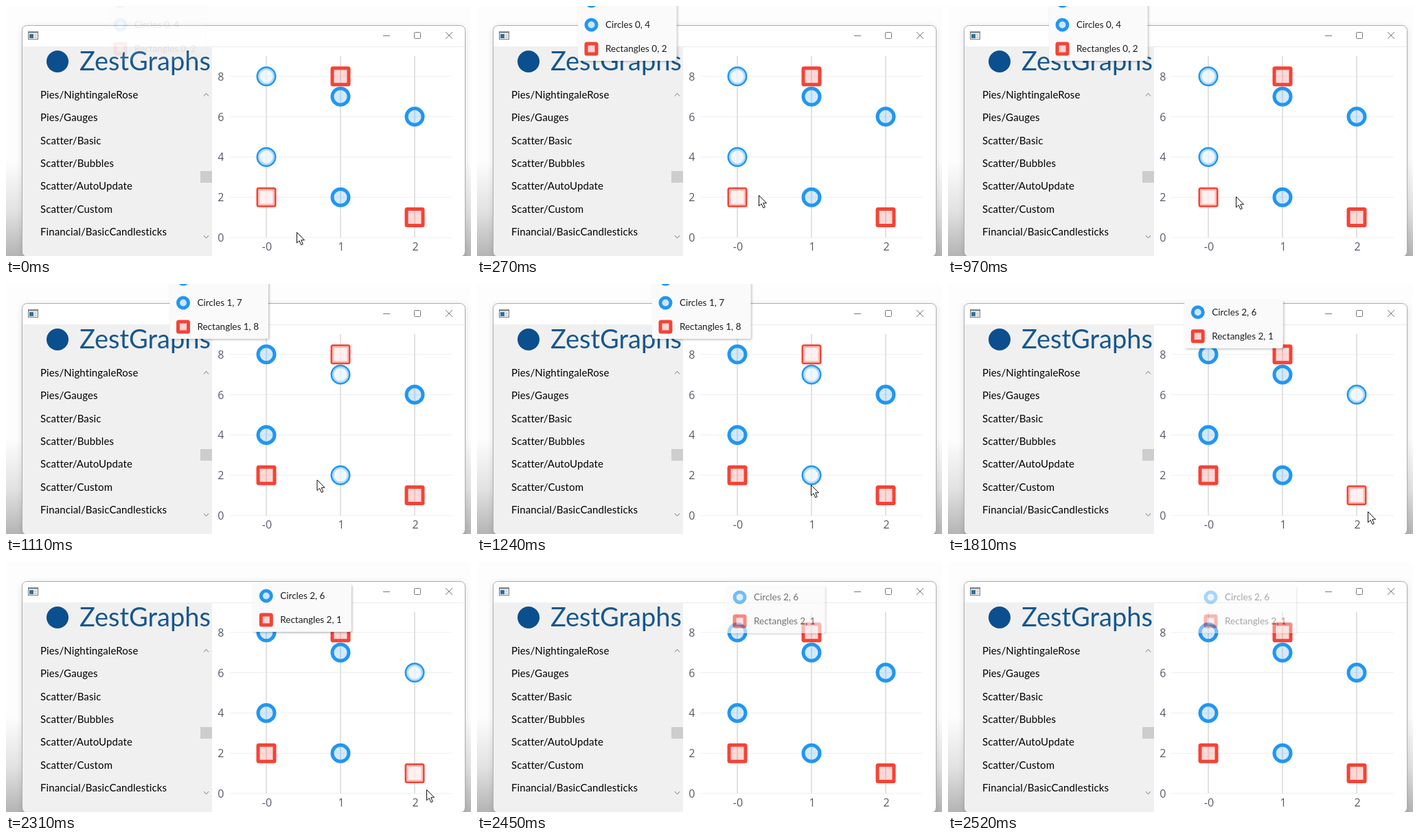
An HTML page that plays this animation: 677x365 px, repeating every 2.59 s.

```html
<!DOCTYPE html>
<html lang="en">
<head>
<meta charset="utf-8">
<title>Scatter chart tooltip</title>
<style>
html, body { margin: 0; width: 100%; height: 100%; overflow: hidden; background: #fdfdfd; }
svg { display: block; }
text { font-family: Lato, "Open Sans", sans-serif; font-variant-ligatures: none; white-space: pre; }
.axis text { font: 16px "Open Sans", "Noto Sans", sans-serif; fill: #555b66; }
.menu text { font-size: 15px; letter-spacing: .1px; }
.tip text { font-size: 13.5px; fill: #1e1e1e; }
.line { fill: none; stroke: #777; }
</style>
</head>
<body>
<svg width="677" height="365" viewBox="0 0 677 365">
  <defs>
    <linearGradient id="desk" x2="0" y2="1">
      <stop offset=".62" stop-color="#fdfdfd"/>
      <stop offset=".82" stop-color="#e2e2e2"/>
      <stop offset="1" stop-color="#b4b4b4"/>
    </linearGradient>
    <filter id="soft" x="-10%" y="-10%" width="120%" height="125%">
      <feDropShadow dx="0" dy="3" stdDeviation="5" flood-opacity=".16"/>
    </filter>
    <filter id="tipShade" x="-10%" y="-20%" width="120%" height="140%">
      <feDropShadow dx="1.5" dy="1.5" stdDeviation="1.6" flood-opacity=".25"/>
    </filter>
    <clipPath id="frame"><rect x="24" y="28" width="644" height="338" rx="7"/></clipPath>
  </defs>
  <rect width="677" height="365" fill="url(#desk)"/>
  <rect x="24" y="28" width="644" height="338" rx="7" fill="#fff" filter="url(#soft)"/>
  <g clip-path="url(#frame)">
    <rect x="24" y="59" width="276" height="310" fill="#f0f0f0"/>
    <path d="M300 59.5H668" stroke="#e9e9e9"/>
  </g>
  <rect x="23.5" y="28.5" width="645" height="337.5" rx="7" fill="none" stroke="#adadad"/>

  <!-- title bar -->
  <rect x="32.5" y="37.5" width="14" height="11" fill="#f4f4f4" stroke="#777"/>
  <path d="M33 38.5H46" stroke="#888" stroke-width="2"/>
  <rect x="34" y="41" width="6" height="6" fill="#2f6f9f"/>
  <path d="M41 42.5H45M41 45.5H45" stroke="#aaa"/>
  <path class="line" d="M549 43.5H559M640 38L650 48M650 38L640 48"/>
  <rect class="line" x="594.5" y="38.5" width="9" height="9" rx="1"/>

  <!-- side panel -->
  <circle cx="75" cy="81" r="16" fill="#0b4f8f"/>
  <text x="107" y="94" font-size="38" fill="#17578f">ZestGraphs</text>
  <g class="menu" id="menu"></g>
  <rect x="283" y="241" width="17" height="17" fill="#cdcdcd"/>
  <path class="line" d="M288 131.5L291.5 127.5L295 131.5M288 335L291.5 339L295 335"/>

  <g class="axis" id="axis"></g>
  <g id="live"></g>
</svg>
<script>
const $ = id => document.getElementById(id);
const BLUE = '#2196f3', RED = '#f44336', GAP = 108;
const colX = c => 379 + GAP * c;
const rowY = v => 338 - 29.4 * v;

const items = ['Pies/NightingaleRose', 'Pies/Gauges', 'Scatter/Basic', 'Scatter/Bubbles',
  'Scatter/AutoUpdate', 'Scatter/Custom', 'Financial/BasicCandlesticks'];
$('menu').innerHTML = items.map((s, i) =>
  `<text x="50" y="${135 + i * 33.3}">${s}</text>`).join('');

$('axis').innerHTML =
  [0, 2, 4, 6, 8].map(v => `<path d="M325 ${rowY(v)}H649" stroke="#eee"/>
    <text x="317.5" y="${rowY(v) + 6}" text-anchor="end">${v}</text>`).join('') +
  ['-0', '1', '2'].map((s, c) => `<path d="M${colX(c)} 73V338" stroke="#e2e2e2" stroke-width="2"/>
    <text x="${colX(c) + 1}" y="357" text-anchor="middle">${s}</text>`).join('');

// Values per column; the last one belongs to the rectangles
const columns = [[8, 4, 2], [2, 7, 8], [6, 1]];
const isRect = (vals, i) => i === vals.length - 1;

const shape = (rect, x, y, r, attrs) => rect
  ? `<rect x="${x - r}" y="${y - r}" width="${2 * r}" height="${2 * r}" rx="1" ${attrs}/>`
  : `<circle cx="${x}" cy="${y}" r="${r}" ${attrs}/>`;

function marker(rect, x, y, r, hover) {
  const color = rect ? RED : BLUE;
  return shape(rect, x, y, r, `fill="${color}" fill-opacity=".2" stroke="${color}" stroke-width="5"`) +
    (hover ? shape(rect, x, y, r, 'fill="#fff" fill-opacity=".65"') : '');
}

function tooltip(col, x, y, opacity) {
  const vals = columns[col];
  const rows = vals.map((v, i) => {
    const rect = isRect(vals, i), cy = 17.5 + 35 * i;
    return marker(rect, 19.5, cy, 7.5) +
      `<text x="40" y="${cy + 4.5}">${rect ? 'Rectangles' : 'Circles'} ${col}, ${v}</text>`;
  }).join('');
  return `<g class="tip" transform="translate(${x} ${y})" opacity="${opacity}">
    <rect width="143.5" height="${35 * vals.length}" rx="3" fill="#fafafa" filter="url(#tipShade)"/>${rows}</g>`;
}

const arrow = (x, y) => `<path transform="translate(${x + .5} ${y + .5})"
  d="M0 0V15.5L3.6 12.2L6.3 18.3L8.8 17.2L6.2 11.3H11Z" fill="#fff" stroke="#111"/>`;

// Time runs in short steps; the scene rests on a few of them
const LOOP = 2590, STEP = 67, STEPS = 16;
const rests = { 4: 700, 9: 500, 11: 500 };
function stepAt(ms) {
  let n = 0;
  while (n < STEPS - 1 && (ms -= rests[n] || STEP) >= 0) n++;
  return n;
}

// Pointer stops: step, x, y
const stops = [[0, 423, 330], [4, 410, 276], [5, 419, 278], [9, 486, 293],
  [11, 611, 332], [12, 612, 332], [14, 612, 370]];
function pointerAt(n) {
  const i = stops.findIndex(s => s[0] > n);
  if (i < 0) return stops[stops.length - 1].slice(1);
  const [n0, x0, y0] = stops[i - 1], [n1, x1, y1] = stops[i];
  const k = (n - n0) / (n1 - n0);
  return [x0 + (x1 - x0) * k, y0 + (y1 - y0) * k];
}

// Slides and fades share one length, in steps
const SPAN = 4.3;
const progress = (n, from) => Math.min(1, Math.max(0, (n - from) / SPAN));
const easeOut = p => 1 - (1 - p) ** 3;

function draw(n) {
  const [px, py] = pointerAt(n);
  const col = Math.round((px - colX(0)) / GAP);
  const inside = py < 365;
  const points = columns.map((vals, c) => vals.map((v, i) =>
    marker(isRect(vals, i), colX(c), rowY(v), 12, inside && c === col)).join('')).join('');
  const first = easeOut(progress(n, 5)), second = easeOut(progress(n, 9.1));
  const opacity = progress(n, -.35) - progress(n, 12.4);
  $('live').innerHTML = points +
    tooltip(col, 147 + GAP * (first + second), -25 + 59 * second, opacity) +
    arrow(px, py);
}

const start = performance.now();
let last = -1;
function frame() {
  const n = stepAt((performance.now() - start) % LOOP);
  if (n !== last) draw(last = n);
  requestAnimationFrame(frame);
}
frame();
</script>
</body>
</html>
```
